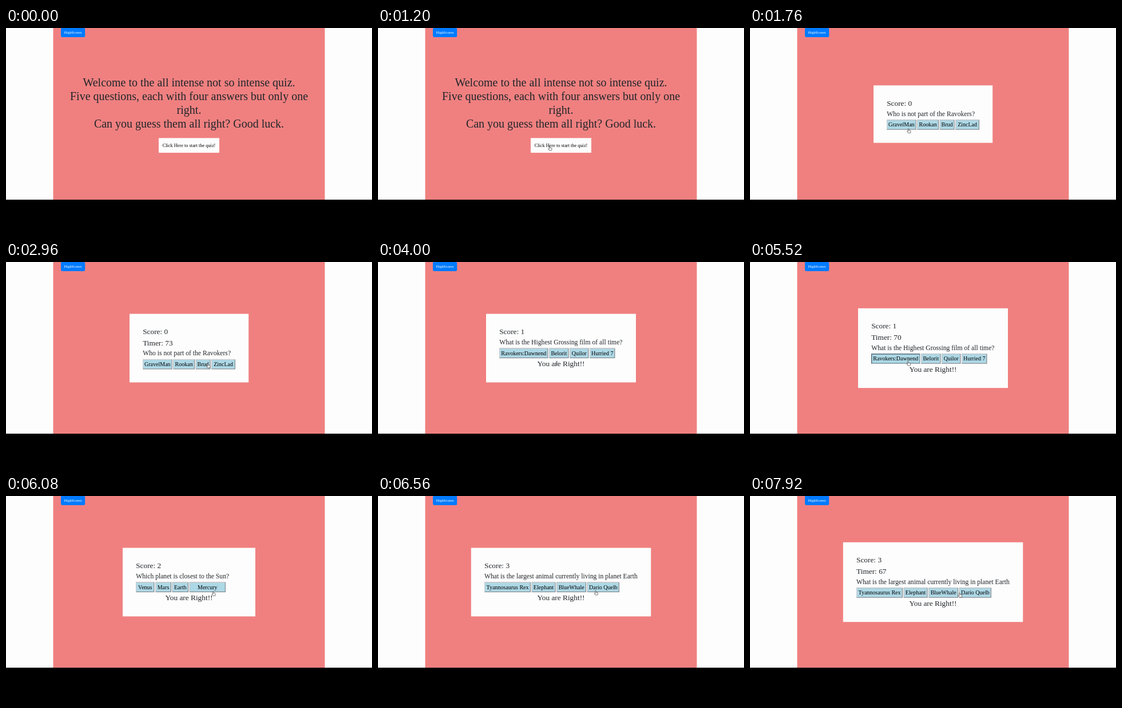
Animation, 640 px wide and 360 px high, one loop 8 s. Source, as an HTML page:

```html
<!DOCTYPE html>
<html lang="en">
<head>
<meta charset="utf-8">
<title>Quiz</title>
<style>
  html, body { margin: 0; width: 100%; height: 100%; overflow: hidden; background: #fdfdfd; }
  svg { display: block; width: 640px; height: 360px; }
  text { font-family: "Liberation Serif", "Times New Roman", serif; fill: #212529; }
  .mid { text-anchor: middle; }
  .welcome { font-size: 20px; }
  .head { font-size: 13.33px; }
  .question { font-size: 11.65px; }
  .answer { font-size: 10px; fill: #000; }
  .start { font-size: 8.33px; fill: #000; }
  .scores { font-size: 6.67px; fill: #fff; }
</style>
</head>
<body>
<svg viewBox="0 0 640 360">
  <rect width="640" height="360" fill="#fdfdfd"/>
  <rect x="82.5" width="475" height="300" fill="#f08080"/>
  <rect y="300" width="640" height="60" fill="#000"/>
  <rect x="96" y="-.3" width="42.2" height="16.3" rx="2.5" fill="#007bff"/>
  <text class="scores mid" x="117" y="10.3">HighScores</text>
  <g id="scene"></g>
  <g id="cursor" stroke-linejoin="round" stroke-linecap="round">
    <path id="hand" fill="#fff" stroke="#222" stroke-width=".6"
      d="M-.7 .5Q0-.4 .7 .5V3.2L3.4 3.7Q4.2 4 4.1 5L3.5 8H-.5L-2.4 5.3Q-2.3 4.2-.7 5.1Z"/>
    <path id="beam" fill="none" stroke="#333" stroke-width=".7" d="M-1.3-3.5Q0-3.5 0-2.7V2.7Q0 3.5-1.3 3.5M1.3-3.5Q0-3.5 0-2.7M0 2.7Q0 3.5 1.3 3.5"/>
    <path id="arrow" fill="#fff" stroke="#222" stroke-width=".6" d="M0 0V7.2L1.7 5.7L2.8 8.2L3.9 7.7L2.8 5.3H5Z"/>
  </g>
</svg>
<script>
const LOOP = 8000, STEP = 80, FIRST_TICK = 1960, TICK = 840;
const $ = id => document.getElementById(id);

// Each answer is [label, left, right]
const quiz = [
  { from: 1280, score: 0, left: 216, right: 424.2, ask: "Who is not part of the Ravokers?",
    answers: [["GravelMan", 239, 290.7], ["Rookan", 292.2, 330], ["Brud", 331.6, 357.6], ["ZincLad", 359.2, 401]] },
  { from: 3760, score: 1, left: 189, right: 451, ask: "What is the Highest Grossing film of all time?",
    answers: [["Ravokers:Dawnend", 212, 297.5], ["Belorit", 299, 333.6], ["Quilor", 335.2, 368.5], ["Hurried 7", 370, 414.5]] },
  { from: 5640, score: 2, left: 204, right: 436, ask: "Which planet is closest to the Sun?",
    answers: [["Venus", 227, 259.5], ["Mars", 261, 289], ["Earth", 290.5, 319], ["Mercury", 340, 384]] },
  { from: 6480, score: 3, left: 162.8, right: 477.3, ask: "What is the largest animal currently living in planet Earth",
    answers: [["Tyannosaurus Rex", 186, 267], ["Elephant", 268.6, 310.6], ["BlueWhale", 312.3, 364], ["Dario Quelb", 365.7, 422]] }
];
quiz[2].answers[3] = ["Mercury", 320.5, 384];

// Pointer stops: time, x, y
const stops = [
  [720, 532, 140], [1120, 300, 206], [1360, 300, 206], [1680, 277, 175.5], [1800, 277, 175.5],
  [2320, 415, 176], [2480, 415, 176], [2880, 353, 177], [3040, 353, 177], [3440, 312.5, 177],
  [4320, 312.5, 177], [4640, 345, 172], [5200, 276.5, 173], [5640, 276.5, 173],
  [6240, 380.5, 165], [6720, 380.5, 165], [7280, 330, 167], [7840, 366.5, 169]
];

const text = (cls, x, y, label) => `<text class="${cls}" x="${x}" y="${y}">${label}</text>`;
const box = (x, y, w, h, fill) => `<rect x="${x}" y="${y}" width="${w}" height="${h}" fill="${fill}"/>`;

function pointerAt(t) {
  const next = stops.findIndex(s => s[0] > t);
  if (next === 0) return null;
  if (next < 0) return stops[stops.length - 1].slice(1);
  const a = stops[next - 1], b = stops[next];
  const u = (t - a[0]) / (b[0] - a[0]), k = u * u * (3 - 2 * u);
  return [a[1] + (b[1] - a[1]) * k, a[2] + (b[2] - a[2]) * k];
}

function button([label, left, right], y, pressed) {
  const w = right - left, h = 17.6;
  const light = pressed ? "#4c626d" : "#c9ced1", dark = pressed ? "#7f99a5" : "#7d888e";
  return box(left, y, w, h, dark) +
    `<path fill="${light}" d="M${left} ${y}h${w}l-1.3 1.3v${h - 2.6}H${left + 1.3}L${left} ${y + h}Z"/>` +
    box(left + 1.3, y + 1.3, w - 2.6, h - 2.6, "#add8e6") +
    text("answer mid", (left + right) / 2, y + 12.2, label);
}

function welcome() {
  const lines = ["Welcome to the all intense not so intense quiz.",
    "Five questions, each with four answers but only one", "right.",
    "Can you guess them all right? Good luck."];
  return lines.map((line, i) => text("welcome mid", 320, 102 + 24 * i, line)).join("") +
    box(267, 192.3, 106, 25.7, "#fdfdfd") +
    text("start mid", 320, 208, "Click Here to start the quiz!");
}

function layout(page, t) {
  const ticks = Math.floor((t - FIRST_TICK) / TICK);
  const timed = ticks >= 0 && FIRST_TICK + ticks * TICK >= page.from;
  const extra = timed ? 19.4 : 0;
  const height = 100.4 + extra + (page.score ? 19.4 : 0);
  const top = 150.5 - height / 2;
  return { top, height, extra, timer: timed ? 74 - ticks : null, row: top + 59.9 + extra };
}

function question(page, t, pressed) {
  const { top, height, extra, timer, row } = layout(page, t);
  const x = page.left + 23.2;
  return box(page.left, top, page.right - page.left, height, "#fdfdfd") +
    text("head", x, top + 35.5, "Score: " + page.score) +
    (timer === null ? "" : text("head", x, top + 54.9, "Timer: " + timer)) +
    text("question", x, top + 53.2 + extra, page.ask) +
    page.answers.map((a, i) => button(a, row, i === pressed)).join("") +
    (page.score ? text("head mid", 320, top + 91.7 + extra, "You are Right!!") : "");
}

function draw(t) {
  const index = quiz.filter(p => p.from <= t).length - 1;
  const page = quiz[index], pointer = pointerAt(t);
  let shape = "arrow", pressed = -1;

  if (page) {
    const { row, top, height } = layout(page, t);
    if (pointer) {
      const [x, y] = pointer;
      const over = y > row && y < row + 18 ? page.answers.findIndex(a => x > a[1] - 1.6 && x < a[2]) : -1;
      const onMessage = page.score && y > row + 18 && y < top + height - 23;
      if (over >= 0) shape = "hand";
      else if (onMessage) shape = "beam";
      const next = quiz[index + 1];
      if (next && t >= next.from - 160) pressed = over;
    }
  } else if (pointer) {
    const [x, y] = pointer;
    if (x > 267 && x < 373 && y > 192 && y < 218) shape = "hand";
  }

  $("scene").innerHTML = page ? question(page, t, pressed) : welcome();
  for (const id of ["hand", "beam", "arrow"])
    $(id).style.display = pointer && id === shape ? "" : "none";
  if (pointer) $("cursor").setAttribute("transform", `translate(${pointer})`);
}

const began = performance.now();
let shown = -1;
function play() {
  const t = Math.floor((performance.now() - began) % LOOP / STEP) * STEP;
  if (t !== shown) draw(shown = t);
  requestAnimationFrame(play);
}
play();
</script>
</body>
</html>
```
